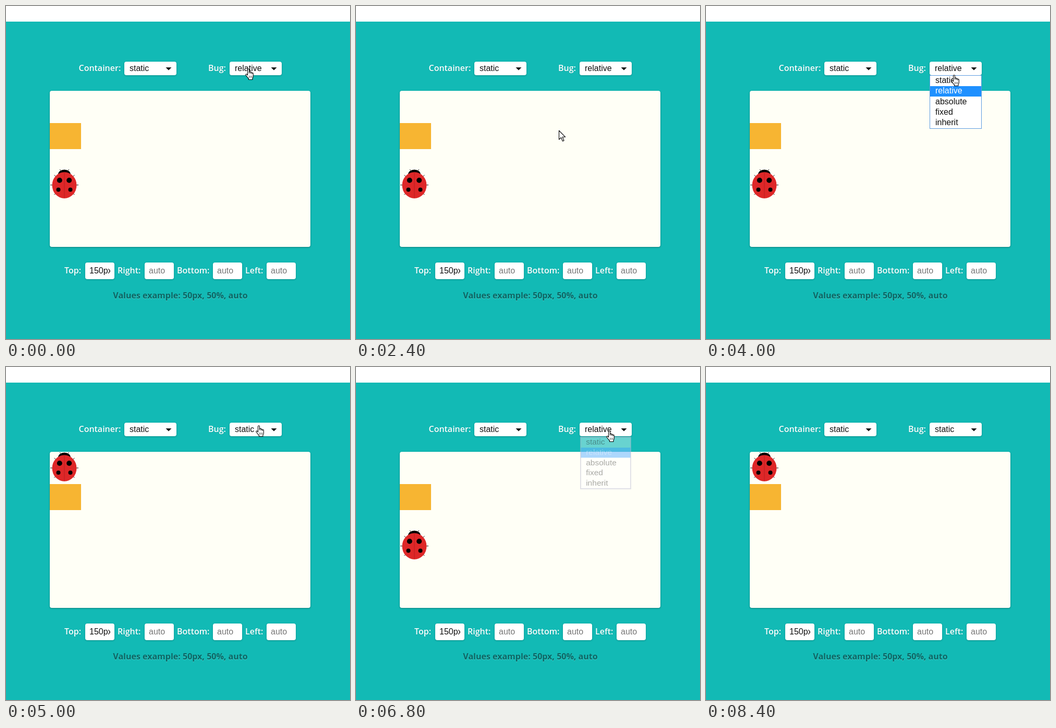
An HTML page with a canvas that plays this animation: 660x640 px, repeating every 9200 ms.

```html
<!DOCTYPE html>
<html lang="en">
<head>
<meta charset="utf-8">
<title>CSS position demo</title>
<style>
html, body { margin: 0; width: 100%; height: 100%; overflow: hidden; background: #fff; }
canvas { display: block; }
</style>
</head>
<body>
<canvas id="stage" width="660" height="640"></canvas>
<script>
const ctx = document.getElementById('stage').getContext('2d');
const LOOP = 9200, STEP = 200;
const SANS = '"Open Sans", sans-serif';
const ARIAL = '16px "Liberation Sans", Arial, sans-serif';
const OPTIONS = ['static', 'relative', 'absolute', 'fixed', 'inherit'];

const HAND = new Path2D('M4.5 13V2.2a1.5 1.5 0 0 1 3 0V9V7.4a1.4 1.4 0 0 1 2.8 .2V9.4V8.4a1.3 1.3 0 0 1 2.6 .2V10.4V9.6a1.2 1.2 0 0 1 2.4 .3V15q0 2-1.4 4V21.5H6.5V19.5Q4 17 1 12.8a1.3 1.3 0 0 1 2-1.6z');
const ARROW = new Path2D('M.5 .5V17.5L4.5 13.8L7.4 20.8L10 19.7L7.2 12.8H12.7Z');

// Pointer path: time, x, y
const PATH = [
  [0, 465, 120], [200, 458, 130], [600, 340, 380], [900, 225, 545], [1200, 185, 517],
  [1800, 185, 517], [2100, 270, 420], [2600, 468, 118], [3400, 475, 116], [3800, 475, 118],
  [4200, 477, 145], [4600, 478, 145], [4800, 484, 113], [5000, 485, 112], [5400, 485, 112],
  [5800, 482, 120], [6200, 475, 165], [6600, 476, 163], [6800, 486, 122], [7200, 486, 122],
  [7400, 480, 145], [7600, 480, 145], [7800, 485, 114], [8000, 492, 160], [8200, 510, 600]
];

// Select menu: opens, closes, value chosen
const PICKS = [[3800, 4800, 'static'], [5800, 6800, 'relative'], [7200, 7800, 'static']];

function pointerAt(t) {
  const i = PATH.findIndex(p => p[0] >= t);
  if (i < 0) return null;
  if (i === 0) return { x: PATH[0][1], y: PATH[0][2] };
  const [t0, x0, y0] = PATH[i - 1], [t1, x1, y1] = PATH[i];
  const k = (t - t0) / (t1 - t0);
  return { x: Math.round(x0 + (x1 - x0) * k), y: Math.round(y0 + (y1 - y0) * k) };
}

function text(str, x, y, font, color, align = 'left') {
  ctx.font = font;
  ctx.fillStyle = color;
  ctx.textAlign = align;
  ctx.fillText(str, x, y);
}

function box(x, y, w, h, fill, shadow = 0.25) {
  ctx.save();
  ctx.shadowColor = `rgba(0,0,0,${shadow})`;
  ctx.shadowOffsetY = 1;
  ctx.shadowBlur = 3;
  ctx.fillStyle = fill;
  ctx.beginPath();
  ctx.roundRect(x, y, w, h, 4);
  ctx.fill();
  ctx.restore();
}

function ellipse(x, y, rx, ry, fill) {
  ctx.fillStyle = fill;
  ctx.beginPath();
  ctx.ellipse(x, y, rx, ry, 0, 0, Math.PI * 2);
  ctx.fill();
}

function line(x0, y0, x1, y1, color = '#111') {
  ctx.strokeStyle = color;
  ctx.lineWidth = 1;
  ctx.beginPath();
  ctx.moveTo(x0, y0);
  ctx.lineTo(x1, y1);
  ctx.stroke();
}

function label(str, x, y) {
  text(str, x, y + 1, '600 16px ' + SANS, 'rgba(0,0,0,.12)');
  text(str, x, y, '600 16px ' + SANS, '#fff');
}

function select(name, nameX, x, value) {
  label(name, nameX, 125);
  box(x, 107, 100, 26, '#fff');
  text(value, x + 10, 125, ARIAL, '#111');
  ctx.fillStyle = '#111';
  ctx.beginPath();
  ctx.moveTo(x + 79.5, 118);
  ctx.lineTo(x + 90.5, 118);
  ctx.lineTo(x + 85, 123.5);
  ctx.fill();
}

function field(name, nameX, x, value) {
  label(name, nameX, 514);
  box(x, 493, 56, 32, '#fff');
  ctx.save();
  ctx.beginPath();
  ctx.rect(x + 8, 493, 40, 32);
  ctx.clip();
  text(value || 'auto', x + 8, 514, ARIAL, value ? '#111' : '#757575');
  ctx.restore();
}

function ladybug(top) {
  ctx.save();
  ctx.translate(112, top + 31);
  for (const s of [-1, 1]) {
    line(s * 22, 0, s * 27, 0);
    line(s * 15, -15, s * 19.5, -19);
    line(s * 15, 15, s * 19.5, 18.5);
    line(s * 5, -26, s * 9, -30);
  }
  ellipse(0, -20, 12, 9.5, '#000');
  ellipse(0, 0.5, 23.5, 25.2, '#de2728');
  line(0, -24, 0, 25, '#b91f22');
  for (const s of [-1, 1]) {
    ellipse(s * 9.2, -9, 5, 5, '#000');
    ellipse(s * 11.5, 9, 4, 4, '#000');
  }
  ctx.restore();
}

function menu(active, fading) {
  ctx.save();
  if (fading) {
    ctx.globalAlpha = 0.36;
    ctx.translate(479, 185);
    ctx.scale(0.97, 0.97);
    ctx.translate(-479, -185);
  }
  ctx.fillStyle = '#fff';
  ctx.fillRect(429, 133, 100, 103);
  ctx.strokeStyle = fading ? '#a9a9c4' : '#5c9be0';
  ctx.lineWidth = fading ? 2 : 1;
  ctx.strokeRect(429.5, 133.5, 99, 102);
  OPTIONS.forEach((name, i) => {
    const y = Math.round(134 + i * 20.25);
    if (i === active) {
      ctx.fillStyle = '#1e90ff';
      ctx.fillRect(430, y, 98, 20);
    }
    text(name, 440, y + 14, ARIAL, i === active ? '#fff' : '#111');
  });
  ctx.restore();
}

function pointer({ x, y }) {
  const overSelect = y >= 107 && y < 133 && x >= 429 && x < 529;
  const overField = y >= 493 && y < 525 && x >= 152 && x < 208;
  if (overField) {
    line(x + 0.5, y - 5, x + 0.5, y + 6);
    line(x - 2, y - 4.5, x + 3, y - 4.5);
    line(x - 2, y + 6.5, x + 3, y + 6.5);
    return;
  }
  ctx.save();
  ctx.translate(overSelect ? x - 6 : x, y);
  ctx.lineWidth = 1.1;
  ctx.lineJoin = 'round';
  ctx.fillStyle = '#fff';
  ctx.strokeStyle = '#000';
  const shape = overSelect ? HAND : ARROW;
  ctx.fill(shape);
  ctx.stroke(shape);
  if (overSelect) for (const k of [8, 10.5, 13]) line(k - 0.4, 14, k - 0.4, 18, '#555');
  ctx.restore();
}

function draw(t) {
  let value = 'relative';
  for (const [, close, pick] of PICKS) if (t >= close) value = pick;
  const pos = pointerAt(t);

  ctx.fillStyle = '#fff';
  ctx.fillRect(0, 0, 660, 30);
  ctx.fillStyle = '#12bab5';
  ctx.fillRect(0, 30, 660, 610);

  select('Container:', 139.5, 227, 'static');
  select('Bug:', 388, 429, value);

  box(84, 163, 500, 300, '#fffff6', 0.35);
  ctx.fillStyle = '#f7b532';
  ctx.fillRect(84, 225, 60, 50);
  ladybug(value === 'relative' ? 313 : 163);

  field('Top:', 112, 152, '150px');
  field('Right:', 214, 266);
  field('Bottom:', 328, 397);
  field('Left:', 459, 500);

  const hint = 'Values example: 50px, 50%, auto';
  text(hint, 334.5, 563, '700 16px ' + SANS, 'rgba(255,255,255,.25)', 'center');
  text(hint, 334.5, 562, '700 16px ' + SANS, '#0b6563', 'center');

  for (const [open, close, pick] of PICKS) {
    if (t >= open && t < close) {
      const row = Math.floor((pos.y - 134) / 20.25);
      menu(row >= 0 ? row : OPTIONS.indexOf(value), false);
    } else if (t === close) {
      menu(OPTIONS.indexOf(pick), true);
    }
  }

  if (t >= 1200 && t < 2000) line(187.5, 501, 187.5, 517);
  if (pos) pointer(pos);
}

const start = performance.now();
function tick() {
  const t = (performance.now() - start) % LOOP;
  draw(Math.floor(t / STEP) * STEP);
  requestAnimationFrame(tick);
}
tick();
</script>
</body>
</html>
```
